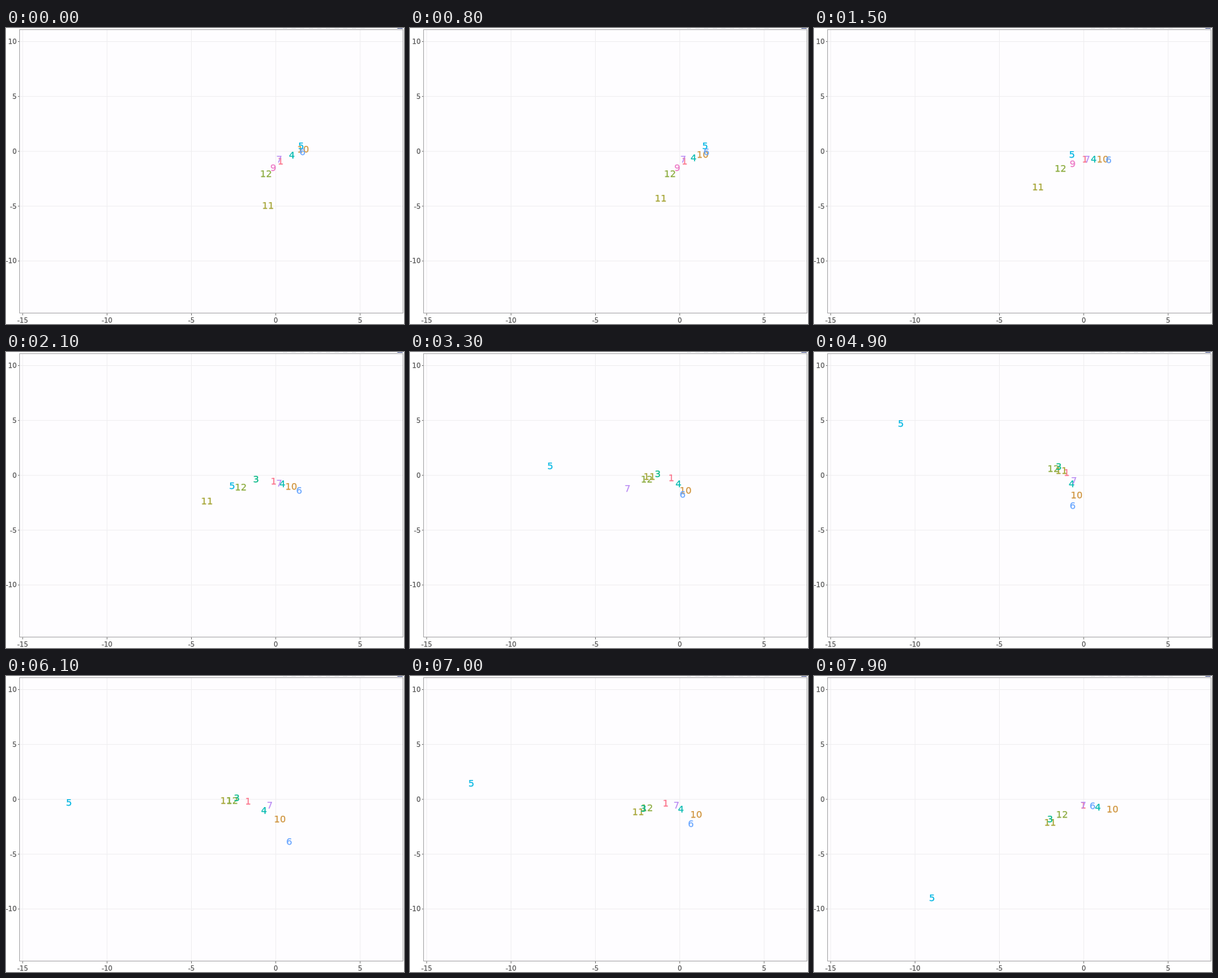
Animation of 600 by 447 pixels, one loop 8 s. Source, as an HTML page with a canvas:

```html
<!DOCTYPE html>
<html lang="en">
<head>
<meta charset="utf-8">
<title>Moving labels</title>
<style>
  html, body { margin: 0; width: 100%; height: 100%; overflow: hidden; background: #fff; }
  canvas { display: block; }
</style>
</head>
<body>
<canvas id="stage" width="600" height="447"></canvas>
<script>
const ctx = document.getElementById('stage').getContext('2d');
const FONT = '"DejaVu Sans", Verdana, sans-serif';
const LOOP = 8, STEP = 0.1, SWAP = 1.9;
const BOX = { left: 21, top: 2, right: 599, bottom: 431 };

const lerp = (a, b, k) => a + (b - a) * k;

// Straight travel between key points [seconds, x, y], at rest outside them.
function path(...keys) {
  return time => {
    const end = keys.findIndex(key => key[0] > time);
    if (end === 0) return keys[0].slice(1);
    if (end < 0) return keys[keys.length - 1].slice(1);
    const [t0, x0, y0] = keys[end - 1], [t1, x1, y1] = keys[end];
    const k = (time - t0) / (t1 - t0);
    return [lerp(x0, x1, k), lerp(y0, y1, k)];
  };
}

// Stays at a fixed share of the way from one mover to another.
function between(a, b, share) {
  return time => {
    const [ax, ay] = a(time), [bx, by] = b(time);
    return [lerp(ax, bx, share), lerp(ay, by, share)];
  };
}

const one = path([0.8, 414, 202], [4.9, 381, 183], [6.1, 365, 190], [7.9, 406, 196]);
const ten = path([0, 448, 184], [2.1, 430, 204], [4.9, 396, 217], [6.1, 413, 217], [7.9, 450, 202]);
const eleven = path([0, 395, 269], [0.8, 378, 258], [2.1, 303, 226], [3.3, 361, 189],
  [4.9, 373, 180], [6.1, 332, 189], [7.9, 356, 222]);
const twelve = path([0.8, 392, 221], [2.1, 354, 205], [4.9, 361, 177], [6.1, 341, 189], [7.9, 374, 210]);
const three = path([2.1, 377, 193], [4.9, 369, 174], [6.1, 348, 185], [7.9, 356, 217]);
const five = path([0.8, 445, 179], [2.1, 341, 203], [3.6, 179, 165], [4.1, 67, 180],
  [4.9, 131, 109], [6.1, 95, 192], [7.2, 92, 156], [7.9, 178, 336]);
const six = path([0.8, 447, 188], [2.1, 442, 210], [3.3, 411, 216], [4.9, 390, 233],
  [6.1, 427, 251], [7.9, 420, 197]);
const seven = path([2.1, 412, 199], [3.3, 328, 207], [4.9, 392, 195], [7.9, 406, 196]);

const labels = [
  { name: '1', hue: 14, at: one },
  { name: '10', hue: 72, at: ten },
  { name: '11', hue: 100, at: eleven },
  { name: '12', hue: 115, at: twelve },
  { name: '3', hue: 165, at: three, from: SWAP },
  { name: '4', hue: 190, at: between(one, ten, 0.5) },
  { name: '5', hue: 222, at: five },
  { name: '6', hue: 272, at: six },
  { name: '7', hue: 306, at: seven },
  { name: '9', hue: 340, at: between(one, twelve, 0.5), to: SWAP }
];

function rect(color, x, y, w, h) {
  ctx.fillStyle = color;
  ctx.fillRect(x, y, w, h);
}

function text(str, x, y, size, color, align = 'center') {
  ctx.font = `${size}px ${FONT}`;
  ctx.textAlign = align;
  ctx.fillStyle = ctx.strokeStyle = color;
  ctx.lineWidth = 0.25;
  ctx.fillText(str, x, y);
  ctx.strokeText(str, x, y);
}

function drawAxes() {
  const { left, top, right, bottom } = BOX;
  const grid = '#efeef0', mark = '#777', ink = '#555';
  rect('#fff', 0, 0, 600, 447);
  rect('#fefdff', left, top, right - left, bottom - top);
  for (let v = -15; v <= 5; v += 5) {
    const x = 406.2 + v * 25.44;
    rect(grid, x, top, 1, bottom - top);
    rect(mark, x, bottom, 1, 3);
    text(v, x + 0.5, 445, 10, ink);
  }
  for (let v = -10; v <= 10; v += 5) {
    const y = 185.7 - v * 16.57;
    rect(grid, left, y, right - left, 1);
    rect(mark, left - 3, y, 3, 1);
    text(v, left - 5, y + 4, 10, ink, 'right');
  }
  ctx.strokeStyle = '#aaa9ab';
  ctx.lineWidth = 1;
  ctx.strokeRect(left - 0.5, top + 0.5, right - left, bottom - top - 1);
  // Lower edge of the toolbar
  for (let x = 417; x < 535; x += 13) rect('#e8e8ec', x, 0, 7, 1);
  rect('#46538c', 590, 0, 8, 1);
}

function draw(ms) {
  const time = Math.floor((ms / 1000 % LOOP) / STEP + 1e-6) * STEP;
  drawAxes();
  for (const { name, hue, at, from = 0, to = LOOP } of labels) {
    if (time < from - STEP / 2 || time > to - STEP / 2) continue;
    const [x, y] = at(time);
    text(name, x, y + 4.4, 14, `lch(66% 56 ${hue})`);
  }
}

const start = performance.now();
function tick(now) {
  draw(Math.max(0, now - start));
  requestAnimationFrame(tick);
}
draw(0);
requestAnimationFrame(tick);
</script>
</body>
</html>
```
